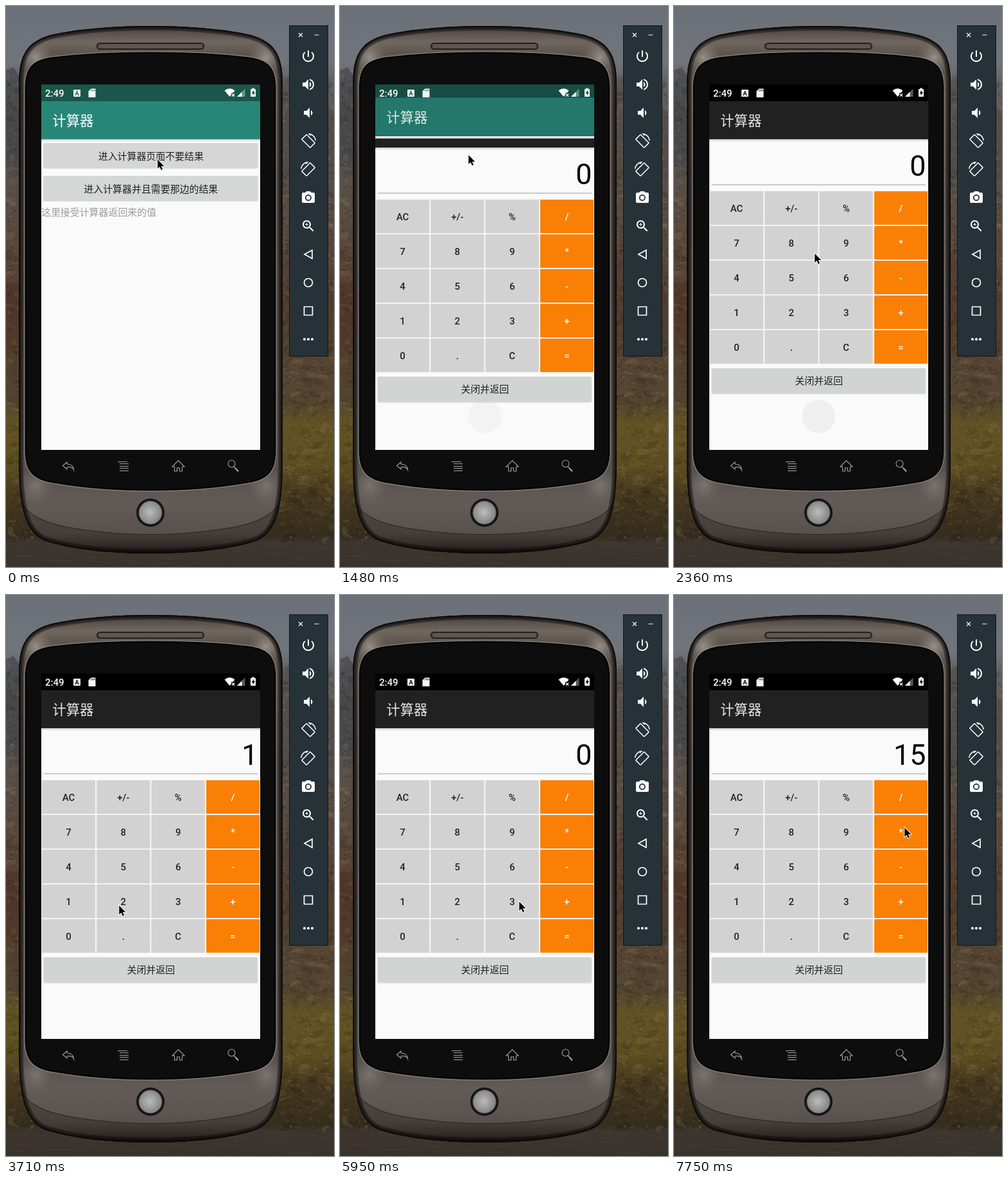
Animation of 511 by 872 pixels, one loop 8 s. Source, as an HTML page with a canvas:

```html
<!DOCTYPE html>
<html lang="zh-CN">
<head>
<meta charset="utf-8">
<style>
html, body { margin: 0; width: 100%; height: 100%; overflow: hidden; background: #3b352e; }
canvas { display: block; }
</style>
</head>
<body>
<canvas id="stage" width="511" height="872"></canvas>
<script>
const W = 511, H = 872, LOOP = 8000;
const CJK = '"Noto Sans CJK SC", "Noto Sans CJK", sans-serif';
const LATIN = 'Roboto, sans-serif';
const SP = 341.3 / 320;
const stage = document.getElementById('stage').getContext('2d');
const still = document.createElement('canvas');
still.width = W;
still.height = H;
let c = still.getContext('2d');

function rect(x, y, w, h, fill, r = 0) {
  c.fillStyle = fill;
  c.beginPath();
  c.roundRect(x, y, w, h, r);
  c.fill();
}
function disc(x, y, r, fill) {
  c.fillStyle = fill;
  c.beginPath();
  c.arc(x, y, r, 0, 7);
  c.fill();
}
function line(d, color, width = 2) {
  c.strokeStyle = color;
  c.lineWidth = width;
  c.stroke(new Path2D(d));
}
function shape(d, fill) {
  c.fillStyle = fill;
  c.fill(new Path2D(d));
}
function text(s, x, y, size, color, font = CJK, align = 'left', weight = 400) {
  c.font = `${weight} ${size}px ${font}`;
  c.textAlign = align;
  c.fillStyle = color;
  c.fillText(s, x, y);
}
function ramp(x0, y0, x1, y1, stops) {
  const g = c.createLinearGradient(x0, y0, x1, y1);
  stops.forEach(([p, color]) => g.addColorStop(p, color));
  return g;
}
function glow(x, y, r, inner, outer) {
  const g = c.createRadialGradient(x, y, 0, x, y, r);
  g.addColorStop(0, inner);
  g.addColorStop(1, outer);
  return g;
}
function at(x, y, draw) {
  c.save();
  c.translate(x, y);
  draw();
  c.restore();
}

function drawLandscape() {
  rect(0, 0, W, H, ramp(0, 0, 0, H, [
    [0, '#6c7078'], [0.1, '#70747b'], [0.14, '#606164'], [0.2, '#5a5755'],
    [0.3, '#57504b'], [0.44, '#574639'], [0.52, '#523c2f'], [0.6, '#51402f'],
    [0.7, '#50432f'], [0.75, '#635324'], [0.82, '#5c4d21'], [0.87, '#47391e'],
    [0.945, '#352d1d'], [0.957, '#3d3630'], [1, '#39322b']]));
  shape('M0 100L12 95L20 108L60 130V250H0Z', 'rgba(62,64,69,.6)');
  shape('M511 165L495 150L440 108L400 140V270H511Z', 'rgba(80,72,69,.5)');
  rect(0, 430, 24, 110, 'rgba(78,40,32,.3)');
  rect(425, 545, 86, 60, 'rgba(92,73,54,.5)');

  let seed = 7;
  const rnd = () => (seed = seed * 16807 % 2147483647) / 2147483647;
  const spot = () => [rnd() < 0.4 ? rnd() * 60 : 420 + rnd() * 91, 108 + rnd() * 725];
  const shade = a => rnd() < 0.55 ? `rgba(22,18,14,${a})` : `rgba(165,140,100,${a})`;
  for (let i = 0; i < 500; i++) {
    const [x, y] = spot();
    c.fillStyle = shade(0.05 + rnd() * 0.12);
    c.beginPath();
    c.ellipse(x, y, 3 + rnd() * 9, 1.5 + rnd() * 4, 0.5 - rnd(), 0, 7);
    c.fill();
  }
  for (let i = 0; i < 4500; i++) {
    const [x, y] = spot();
    rect(x, y, 1 + rnd() * 3, 1 + rnd() * 2, shade(rnd() * 0.26));
  }
  for (let i = 0; i < 120; i++) {
    rect(rnd() * W, 833 + rnd() * 39, 8 + rnd() * 30, 1, shade(rnd() * 0.12));
  }
}

function drawBody() {
  const body = 'M20 118C21 76 32 56 70 45C115 35 175 31 225 31C276 31 336 35 381 45C419 56 430 76 431 118' +
    'V715C430 782 421 822 385 833C342 846 280 851 225 851C170 851 110 846 66 833C30 822 21 782 20 715Z';
  const glass = 'M31 125C32 97 41 85 72 81C118 75 175 73 225 73C276 73 332 75 378 81C409 85 418 97 419 125' +
    'V695C418 722 408 735 376 740C330 748 276 752 225 752C175 752 120 748 74 740C42 735 32 722 31 695Z';
  c.save();
  c.clip(new Path2D(body));
  rect(0, 0, W, H, ramp(0, 31, 0, 851, [
    [0, '#3b3531'], [0.012, '#574f4a'], [0.03, '#70675f'], [0.052, '#5d544e'],
    [0.3, '#4e4743'], [0.85, '#57514e'], [0.9, '#625b58'], [0.95, '#5a5350'], [1, '#4c4542']]));
  for (const x of [46, 405]) {
    rect(x - 30, 45, 60, 70, glow(x, 80, 28, 'rgba(190,183,177,.6)', 'rgba(140,130,124,0)'));
    rect(x - 30, 715, 60, 70, glow(x, 745, 28, 'rgba(170,164,160,.4)', 'rgba(140,130,124,0)'));
  }
  shape('M15 760C34 798 78 808 120 814C190 824 260 824 330 814C373 808 416 798 436 760V860H15Z',
    ramp(0, 780, 0, 851, [[0, '#4d4643'], [0.55, '#453e3a'], [0.8, '#332d2a'], [1, '#151210']]));
  line('M22 768C38 800 78 808 120 814C190 824 260 824 330 814C373 808 412 800 429 768', '#27221f', 1);
  line(glass, 'rgba(165,157,150,.5)', 6);
  [14, 9, 5].forEach(w => line(body, 'rgba(12,10,9,.42)', w));
  line(body, '#080707', 2.5);
  c.restore();

  line(glass, '#151311', 3);
  shape(glass, '#0d0d0d');
  line(glass, '#000', 1.5);

  rect(141, 57, 168, 11, '#1c1917', 5.5);
  rect(142.5, 58.5, 165, 8, '#48423e', 4);
  for (let i = 0; i < 160; i++) {
    for (let j = 0; j < 3; j++) {
      if ((i + j) % 2) rect(145 + i, 60 + j * 2, 1, 1, '#9a9088');
    }
  }

  disc(225, 787.5, 22, '#151414');
  disc(225, 787.5, 18.5, '#555352');
  disc(225, 787.5, 17.5, glow(224, 787, 18, '#bcbcbc', '#858585'));
}

function drawNavKeys() {
  const ink = '#a2a2a2';
  line('M95 709L88.500 714.500L95 720V717C100 716 104 717 105.500 721C105 715 101 712 95 712Z', ink, 1.1);
  line('M174 708.500H189M177 711.500H191M177 715.500H191M177 718.500H191M177 722.500H191', ink, 1);
  line('M259 716L268.500 706.500L278 716H274.500V723H270.500V718H266.500V723H262.500V716Z', ink, 1.1);
  line('M357 711.500A5.500 5.500 0 1 1 346 711.500A5.500 5.500 0 1 1 357 711.500M354.500 715.500L357 718', ink, 1.1);
  line('M357 718L362 723.500', ink, 2.2);
}

const SPIN = 'M16.48 2.52c3.27 1.55 5.61 4.72 5.97 8.48h1.5C23.44 4.84 18.29 0 12 0l-.66.03 3.81 3.81 1.33-1.32z' +
  'm-6.25-.77c-.59-.59-1.54-.59-2.12 0L1.75 8.11c-.59.59-.59 1.54 0 2.12l12.02 12.02c.59.59 1.54.59 2.12 0' +
  'l6.36-6.36c.59-.59.59-1.54 0-2.12L10.23 1.75zm4.6 19.44L2.81 9.17l6.36-6.36 12.02 12.02-6.36 6.36z';
const POWER = 'M13 3h-2v10h2V3zm4.83 2.17l-1.42 1.42C17.99 7.86 19 9.81 19 12c0 3.87-3.13 7-7 7s-7-3.13-7-7' +
  'c0-2.19 1.01-4.14 2.58-5.42L6.17 5.17C4.23 6.82 3 9.26 3 12c0 4.97 4.03 9 9 9s9-4.03 9-9' +
  'c0-2.74-1.23-5.18-3.17-6.83z';
const LOUD = 'M3 9v6h4l5 5V4L7 9H3zm13.5 3c0-1.77-1.02-3.29-2.5-4.03v8.05c1.48-.73 2.5-2.25 2.5-4.02z' +
  'M14 3.23v2.06c2.89.86 5 3.54 5 6.71s-2.11 5.85-5 6.71v2.06c4.01-.91 7-4.49 7-8.77s-2.99-7.86-7-8.77z';
const QUIET = 'M18.5 12c0-1.77-1.02-3.29-2.5-4.03v8.05c1.48-.73 2.5-2.25 2.5-4.02zM5 9v6h4l5 5V4L9 9H5z';
const CAMERA = 'M9 2L7.17 4H4c-1.1 0-2 .9-2 2v12c0 1.1.9 2 2 2h16c1.1 0 2-.9 2-2V6c0-1.1-.9-2-2-2h-3.17L15 2H9z' +
  'm3 15c-2.76 0-5-2.24-5-5s2.24-5 5-5 5 2.24 5 5-2.24 5-5 5z';
const ZOOM = 'M15.5 14h-.79l-.28-.27C15.41 12.59 16 11.11 16 9.5 16 5.91 13.09 3 9.5 3S3 5.91 3 9.5 5.91 16 9.5 16' +
  'c1.61 0 3.09-.59 4.23-1.57l.27.28v.79l5 4.99L20.49 19l-4.99-5zm-6 0C7.01 14 5 11.99 5 9.5S7.01 5 9.5 5' +
  ' 14 7.01 14 9.5 11.99 14 9.5 14zm2.5-4h-2v2H9v-2H7V9h2V7h1v2h2v1z';

function drawPanel() {
  const ink = '#fff';
  const icon = (d, y, flip = 1) => at(471, y, () => {
    c.scale(flip, 1);
    c.translate(-12, -12);
    shape(d, ink);
  });
  rect(441, 30, 61, 515, '#11171a');
  rect(442, 31, 59, 513, '#263238');
  line('M456 42L462 48M462 42L456 48M480.500 45H487.500', ink, 1.2);
  icon(POWER, 78);
  icon(LOUD, 122);
  icon(QUIET, 166);
  icon(SPIN, 210);
  icon(SPIN, 254, -1);
  icon(CAMERA, 298);
  disc(471, 298, 3.2, ink);
  icon(ZOOM, 342);
  line('M477 379.500V392.500L465 386Z', ink, 1.7);
  line('M477.500 430A6.500 6.500 0 1 1 464.500 430A6.500 6.500 0 1 1 477.500 430', ink, 1.7);
  line('M464.500 467.500H477.500V480.500H464.500Z', ink, 1.7);
  [465, 471, 477].forEach(x => disc(x, 518, 2.1, ink));
}

function drawStatus(bg) {
  text('2:49', 61, 140.500, 15, '#fff', LATIN, 'left', 500);
  rect(105, 130, 11, 11, '#f4f4f4', 1);
  text('A', 110.500, 139, 9, bg, LATIN, 'center', 700);
  shape('M132.500 128.500H139.500V142H128.500V132.500Z', '#f4f4f4');
  line('M133 130V132.500M135.500 130V132.500M138 130V132.500', bg, 1);
  shape('M340.500 131.500Q348.500 125 356.500 131.500L348.500 141Z', '#fff');
  rect(351, 135, 7, 7, bg);
  line('M352 136.500L356 140.500M356 136.500L352 140.500', '#fff', 1.3);
  shape('M360 141L372.500 128.500V141Z', 'rgba(255,255,255,.35)');
  shape('M360 141L367.500 133.500V141Z', '#fff');
  rect(381, 129, 8, 12, '#fff', 1);
  rect(383.500, 127.500, 3, 2, '#fff');
  shape('M386 130.500L382.500 136H384.700V139.500L388 134H385.800Z', bg);
}

function drawAppBar(y, bar, ink) {
  rect(55, y, 341, 59, bar);
  text('计算器', 72.300, y + 38, 20 * SP, ink);
}
function drawBarShadow(y) {
  rect(55, y, 341, 4, ramp(0, y, 0, y + 4, [[0, 'rgba(0,0,0,.2)'], [1, 'rgba(0,0,0,0)']]));
}
function drawButton(y, label) {
  rect(58, y + 1, 334.500, 39, 'rgba(0,0,0,.1)', 2);
  rect(58.500, y, 334, 39, '#d5d7d6', 2);
  text(label, 225.800, y + 26, 14 * SP, '#212121', CJK, 'center');
}

function drawMenu(t) {
  rect(55, 122, 341, 568, '#fafafa');
  rect(55, 122, 341, 26, '#1a564a');
  drawAppBar(148, '#288678', '#fff');
  drawBarShadow(207);
  drawButton(213, '进入计算器页面不要结果');
  drawButton(264, '进入计算器并且需要那边的结果');
  text('这里接受计算器返回来的值', 55, 326, 14 * SP, '#9c9c9c');
  if (t >= 740 && t < 1030) rect(58.500, 213, 334, 39, `rgba(0,0,0,${t < 890 ? 0.04 : 0.06})`, 2);
  if (t >= 1030) {
    rect(58, 252, 335, 4, ramp(0, 252, 0, 256, [[0, 'rgba(0,0,0,.12)'], [1, 'rgba(0,0,0,0)']]));
  }
  drawStatus('#1a564a');
}

const KEYS = ['AC', '+/-', '%', '/', '7', '8', '9', '*', '4', '5', '6', '-', '1', '2', '3', '+', '0', '.', 'C', '='];

function drawCalc(shown, dy, spot) {
  rect(55, 122, 341, 568, '#fafafa');
  rect(55, 122, 341, 26, '#000');
  drawAppBar(148 + dy, '#212121', '#e6e6e6');
  drawBarShadow(207 + dy);
  if (spot) disc(225.500, 638, 26, spot);
  text(shown, 392.300, 264.300 + dy, 42 * SP, '#000', LATIN, 'right');
  rect(59, 277 + dy, 333, 1.800, '#c4c5c5');
  rect(55, 287 + dy, 341, 270, '#f3f3f3');
  KEYS.forEach((key, i) => {
    const col = i % 4, x = 56 + col * 85.33, y = 288 + dy + Math.floor(i / 4) * 54;
    const hot = col === 3;
    rect(x, y, 83, 52, hot ? '#f98005' : '#d1d2d1', 1);
    text(key, x + 41.500, y + 31.500, 14 * SP, hot ? '#fff' : '#212121', LATIN, 'center', 500);
  });
  rect(58.500, 564 + dy, 334, 40, 'rgba(0,0,0,.08)', 2);
  rect(58.500, 563 + dy, 333.500, 39.500, '#d2d4d3', 2);
  text('关闭并返回', 225.800, 588 + dy, 14 * SP, '#212121', CJK, 'center');
}

function clipFrom(y, draw) {
  c.save();
  c.beginPath();
  c.rect(55, y, 341, 690 - y);
  c.clip();
  draw();
  c.restore();
}

// The menu slides up and dims while the calculator rises over it.
function drawSwitch() {
  rect(55, 122, 341, 26, '#164d42');
  drawAppBar(142.500, '#23786b', '#dfe8e6');
  rect(55, 202, 341, 5, '#d9d9d9');
  clipFrom(206, () => drawCalc('0', 13, '#f3f3f3'));
  drawStatus('#164d42');
}

// [time, x, y] of the pointer tip
const PATH = [
  [0, 236, 238], [150, 230, 246], [300, 212, 243], [440, 200, 231],
  [2080, 205, 268], [2210, 213, 328], [2360, 219, 384], [2510, 200, 428],
  [2660, 162, 460], [2810, 132, 478], [2960, 124, 478], [3410, 176, 482],
  [4010, 200, 484], [4160, 225, 485], [5060, 311, 490], [5210, 342, 482],
  [5660, 305, 478], [5810, 279, 476], [6110, 312, 522], [6250, 346, 547], [6400, 348, 543],
  [6700, 358, 508], [6850, 362, 459], [7000, 361, 400], [7150, 357, 345],
  [7300, 352, 308], [7450, 349, 293], [7600, 348, 322], [7750, 359, 361]];
const SHOWN = [[0, '0'], [3110, '1'], [3860, '12'], [5360, '0'], [5960, '3'], [6400, '15']];
const current = (list, t) => list.findLast(item => item[0] <= t);

function drawPointer(x, y) {
  const d = 'M0 0V14L3.200 11L5.500 16.300L7.800 15.300L5.500 10.200H10Z';
  at(x + 0.300, y + 0.700, () => {
    line(d, '#fff', 1.8);
    shape(d, '#000');
  });
}

drawLandscape();
drawBody();
drawNavKeys();
drawPanel();
c = stage;

function render(now) {
  const t = now % LOOP;
  c.drawImage(still, 0, 0);
  if (t < 1480) drawMenu(t);
  else if (t < 1630) drawSwitch();
  else {
    drawCalc(current(SHOWN, t)[1], 0, t < 2660 ? '#eeefee' : null);
    drawStatus('#000');
  }
  const [, x, y] = current(PATH, t);
  drawPointer(x, y);
  requestAnimationFrame(render);
}
requestAnimationFrame(render);
</script>
</body>
</html>
```
